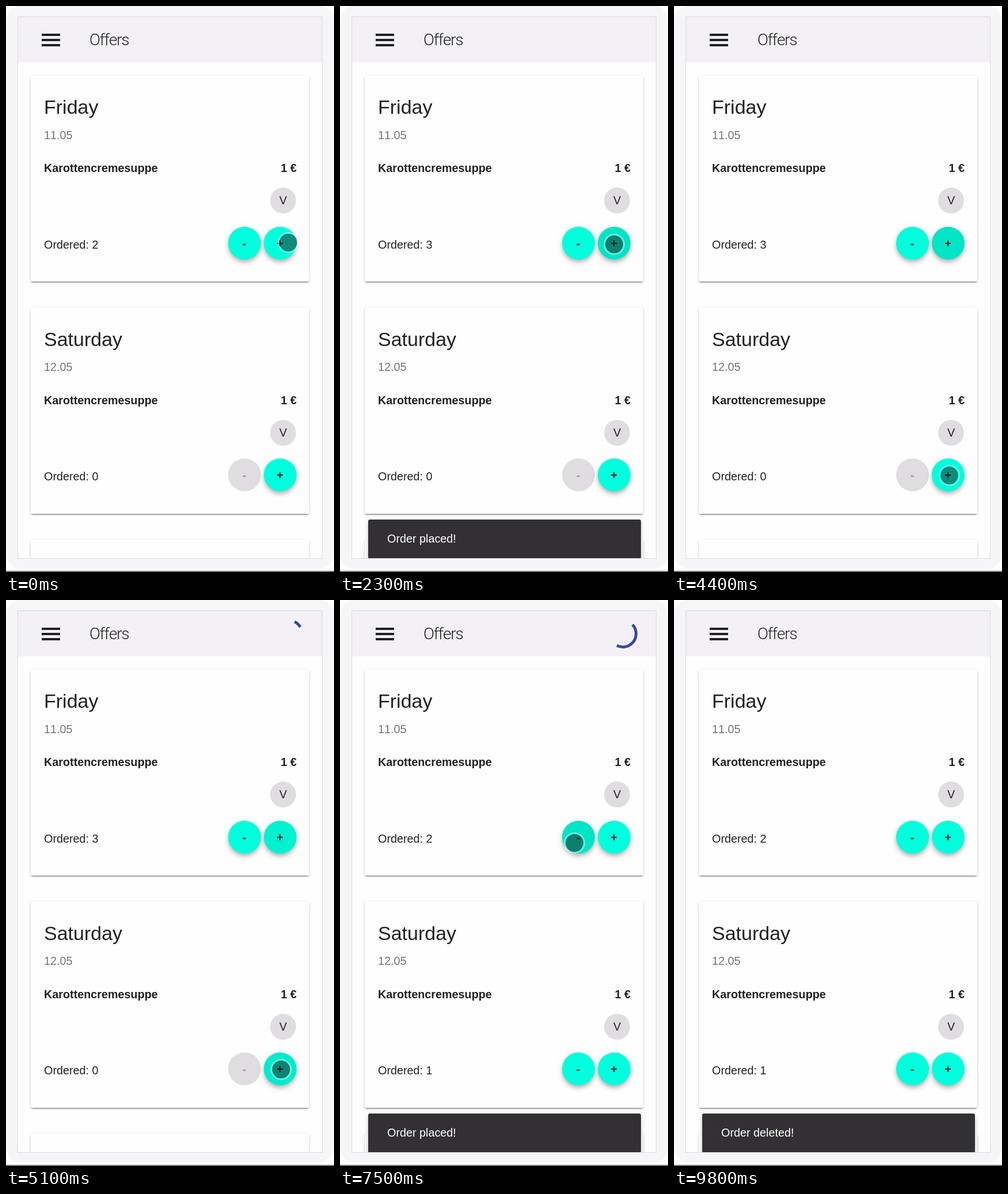
Write an HTML page that moves like this. It is 570 by 982 pixels and loops after 9.9 s.

```html
<!DOCTYPE html>
<html lang="en">
<head>
<meta charset="utf-8">
<title>Offers</title>
<style>
html, body { margin: 0; width: 100%; height: 100%; overflow: hidden; background: #fefefe; }
#stage { position: relative; width: 570px; height: 982px; overflow: hidden; background: #fefefe;
  font-family: "Liberation Sans", Arial, sans-serif; font-kerning: none; color: #212121; }
#stage div, #stage svg { position: absolute; box-sizing: border-box; }
.body { background: #f6f5f8; border-radius: 24px; }
.frame { background: #fefefe; border: 1px solid #d9d8db; }
#screen { inset: 0; clip-path: inset(19px 21px 24px 21px); }
.bar { background: #f3f1f5; }
.ink { background: #212121; }
.card { background: #fefefe; border-radius: 3px;
  box-shadow: 0 4px 1.5px -3px rgba(0,0,0,.3), 0 2px 2.5px rgba(0,0,0,.22), 0 1px 5px rgba(0,0,0,.1); }
.chip, .btn, .shade { border-radius: 50%; }
.chip { background: #dfdde0; }
.btn { background: #00ffdc; overflow: hidden;
  box-shadow: 0 4px 7px -1px rgba(0,0,0,.22), 0 6px 10px rgba(0,0,0,.1), 0 1px 18px rgba(0,0,0,.05); }
.btn.off { background: #dfdde0; box-shadow: none; }
.shade { inset: 0; background: #000; opacity: 0; }
.text { line-height: 0; white-space: pre; }
.snack { background: #323033; border-radius: 3px; box-shadow: 0 3px 7px rgba(0,0,0,.25); }
.cursor { border-radius: 50%; background: rgba(26,26,26,.5); box-shadow: 0 0 0 3px rgba(255,255,255,.42); }
</style>
</head>
<body>
<div id="stage"></div>
<script>
const LOOP = 9900;
const stage = document.getElementById('stage');

function box(parent, cls, x, y, w, h) {
  const el = document.createElement('div');
  el.className = cls;
  Object.assign(el.style, { left: x + 'px', top: y + 'px', width: w + 'px', height: h + 'px' });
  parent.append(el);
  return el;
}

// Places text by its baseline; align is left, center or right around x.
function label(parent, str, x, base, size = 19.8, css = {}, align = 'left') {
  const shift = { left: 0, center: 150, right: 300 }[align];
  const el = box(parent, 'text', x - shift, base - size * 0.3465, 300, 0);
  el.textContent = str;
  Object.assign(el.style, { fontSize: size + 'px', textAlign: align }, css);
  return el;
}

function button(parent, sign, cx, cy) {
  const el = box(parent, 'btn', cx - 28.5, cy - 28.5, 57, 57);
  const shade = box(el, 'shade', 0, 0, 57, 57);
  const text = label(parent, sign, cx, cy + 7.5, 19.8, { fontWeight: 700 }, 'center');
  return { el, shade, text };
}

function offer(parent, day, date, dy) {
  const bold = { fontWeight: 700 };
  box(parent, 'card', 43, 120.5 + dy, 484, 357.5);
  label(parent, day, 66, 187 + dy, 34);
  label(parent, date, 66, 230.5 + dy, 19.8, { color: '#757477' });
  label(parent, 'Karottencremesuppe', 66, 288 + dy, 19.8, bold);
  label(parent, '1 €', 505, 288 + dy, 19.8, bold, 'right');
  box(parent, 'chip', 459, 315 + dy, 45, 45);
  label(parent, 'V', 481.5, 344 + dy, 19.8, {}, 'center');
  return {
    count: label(parent, '', 66, 420.5 + dy),
    minus: button(parent, '-', 414, 411 + dy),
    plus: button(parent, '+', 476, 411 + dy)
  };
}

box(stage, 'body', 1, 0, 568, 976);
box(stage, 'ink', 0, 980, 570, 1.5).style.background = '#7b7b7b';
box(stage, 'frame', 20, 18, 530, 941);
const screen = box(stage, '', 0, 0, 570, 982);
screen.id = 'screen';
box(screen, 'bar', 20, 18, 530, 80);
for (const y of [48, 57, 66]) box(screen, 'ink', 62, y, 32, 3.6);
label(screen, 'Offers', 145, 69, 28,
  { fontFamily: 'Roboto, Inter, sans-serif', fontWeight: 300, letterSpacing: '-1.2px' });

const friday = offer(screen, 'Friday', '11.05', 0);
const saturday = offer(screen, 'Saturday', '12.05', 402.5);
box(screen, 'card', 43, 925.5, 484, 357.5);

screen.insertAdjacentHTML('beforeend',
  `<svg width="570" height="982" style="left:0;top:0"><circle cx="491.5" cy="58.5" r="23"
    pathLength="360" fill="none" stroke="#3848ab" stroke-width="5"/></svg>`);
const arc = screen.querySelector('circle');

const snack = box(screen, 'snack', 49, 890.5, 473.5, 68);
const notice = label(snack, '', 33, 40.5, 19.8, { color: '#fff' });
const cursor = box(stage, 'cursor', -15.5, -15.5, 31, 31);

// Cubic bezier whose control points sit at heights 0 and 1.
function bezier(x1, x2) {
  return x => {
    if (x <= 0) return 0;
    if (x >= 1) return 1;
    let lo = 0, hi = 1, s = 0.5;
    for (let i = 0; i < 24; i++) {
      s = (lo + hi) / 2;
      const bx = 3 * (1 - s) * s * ((1 - s) * x1 + s * x2) + s ** 3;
      if (bx < x) lo = s; else hi = s;
    }
    return s * s * (3 - 2 * s);
  };
}
const sweep = bezier(0.35, 0.25), enter = bezier(0, 0.2), leave = bezier(0.4, 1);
const glide = bezier(0.42, 0.58);
const clamp = v => Math.min(1, Math.max(0, v));

// start, end
const loads = [[790, 1990], [5035, 6290], [7320, 8500]];
// shown, dismissed, message
const notices = [
  [2000, 4100, 'Order placed!'],
  [6290, 8290, 'Order placed!'],
  [8500, Infinity, 'Order deleted!']
];
// start, end, x, y, bend of the sideways motion
const moves = [
  [0, 500, 476, 413, 1],
  [2300, 2900, 414, 421, 1],
  [3300, 4200, 478, 814, 4],
  [5100, 5900, 412, 418, 0.4],
  [6800, 7300, 407, 421, 1],
  [8100, 8700, 550, 432, 1]
];
// button, pressed, released
const presses = [
  [friday.plus, 700, 5000],
  [saturday.plus, 4950, 6000],
  [friday.minus, 7250, 8500]
];

function drawSpinner(t) {
  const load = loads.find(([a, b]) => t >= a - 50 && t < b);
  arc.style.display = load ? '' : 'none';
  if (!load) return;
  const s = Math.max(0, t - load[0]) / 1000;
  const turn = Math.floor(s), part = s - turn;
  const spin = 14 + 180 * s - 90 * turn;
  let from = spin, len;
  if (part < 0.5) {
    len = 18 + 270 * sweep(part * 2);
  } else {
    len = 288 - 270 * sweep(part * 2 - 1);
    from = spin - 72 - len;
  }
  arc.setAttribute('stroke-dasharray', `${len} ${360 - len}`);
  arc.setAttribute('transform', `rotate(${from - 90} 491.5 58.5)`);
}

function drawSnack(t) {
  const item = notices.find(([a, b]) => t >= a && t < b + 195);
  snack.style.display = item ? '' : 'none';
  if (!item) return;
  const [a, b, message] = item;
  const down = t < b ? 1 - enter((t - a) / 225) : leave((t - b) / 195);
  notice.textContent = message;
  snack.style.transform = `translateY(${down * 76}px)`;
}

function drawCursor(t) {
  let x = 490, y = 410;
  for (const [a, b, tx, ty, bend] of moves) {
    if (t < a) break;
    const p = glide((t - a) / (b - a));
    x += (tx - x) * p ** bend;
    y += (ty - y) * p;
  }
  cursor.style.display = t < 8700 ? '' : 'none';
  cursor.style.transform = `translate(${x}px, ${y}px)`;
}

function render(t) {
  friday.count.textContent = 'Ordered: ' + (t >= 1990 && t < 7300 ? 3 : 2);
  const ordered = t >= 6290;
  saturday.count.textContent = 'Ordered: ' + (ordered ? 1 : 0);
  saturday.minus.el.classList.toggle('off', !ordered);
  saturday.minus.text.style.color = ordered ? '' : '#99989a';
  for (const [btn, a, b] of presses)
    btn.shade.style.opacity = 0.1 * clamp((t - a) / 200) * clamp((b + 200 - t) / 200);
  drawSpinner(t);
  drawSnack(t);
  drawCursor(t);
}

const begin = performance.now();
function tick() {
  render((performance.now() - begin) % LOOP);
  requestAnimationFrame(tick);
}
tick();
</script>
</body>
</html>
```
